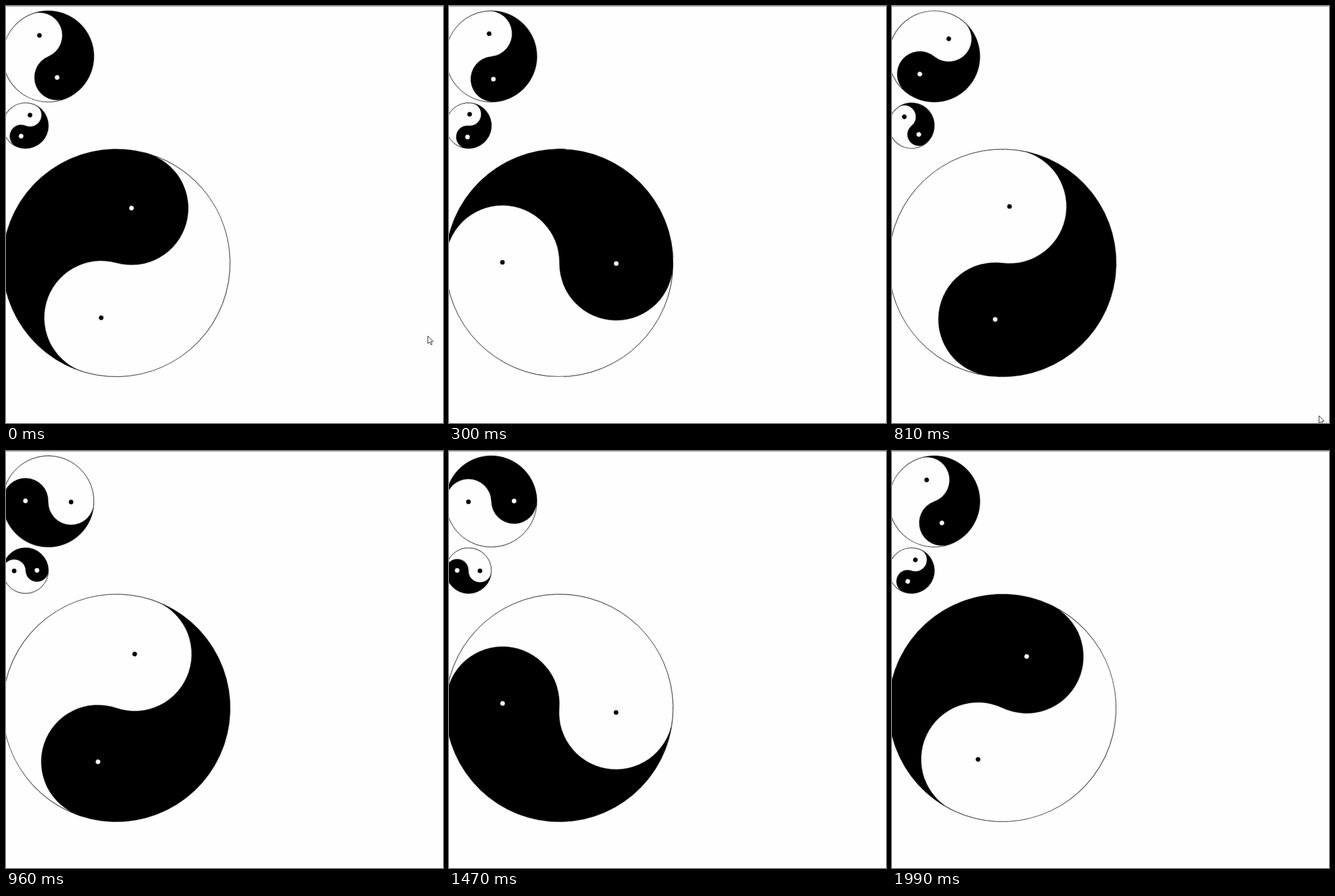
Animation of 766 by 731 pixels, one loop 2.09 s. Source, as an HTML page:

```html
<!DOCTYPE html>
<html lang="en">
<head>
<meta charset="utf-8">
<title>Turning yin-yang</title>
<style>
  html, body { margin: 0; height: 100%; overflow: hidden; background: #fefefe; }
  svg { display: block; }
</style>
</head>
<body>
<svg id="stage" width="766" height="731" viewBox="0 0 766 731">
  <rect width="766" height="1.4" fill="#b4b4b4"/>
  <path id="cursor" d="M0 0V13.2L3.1 10.4 5.3 15.4 7.4 14.5 5.2 9.6H9.2Z" fill="#fff" stroke="#222"/>
</svg>
<script>
const LOOP = 2090;   // ms
const TURN = 1925;   // ms for one full turn
const OFFSET = 1330; // ms into the turn when the loop starts
const BAR = 655;     // the uneven stepping rhythm repeats every bar
const BEATS = [0, 150, 290, 410, 540];

const stage = document.getElementById('stage');
const cursor = document.getElementById('cursor');

function yinYang(x, y, r, degrees, easing) {
  const h = r / 2;
  stage.insertAdjacentHTML('beforeend', `<g transform="translate(${x} ${y})"><g>
    <circle r="${r}" fill="#fefefe" stroke="#000"/>
    <path d="M0 ${-r}A${r} ${r} 0 0 1 0 ${r}A${h} ${h} 0 0 1 0 0A${h} ${h} 0 0 0 0 ${-r}"/>
    <circle cy="${-h}" r="4"/>
    <circle cy="${h}" r="4" fill="#fefefe"/></g></g>`);
  const spin = stage.lastElementChild.firstElementChild.animate(
    { transform: ['rotate(0deg)', `rotate(${degrees}deg)`] },
    { duration: TURN, easing, fill: 'both' });
  spin.pause();
  return spin;
}

const spins = [
  yinYang(74.1, 88.4, 79.9, 360, 'ease'),
  yinYang(34.3, 209.7, 40, -360, 'ease'),
  yinYang(193.4, 450.4, 199.4, 360, 'ease-in')
];

function draw(t) {
  const bar = Math.floor(t / BAR);
  const beat = BEATS.findLastIndex(start => start <= t % BAR);
  const held = bar * BAR + BEATS[beat];
  for (const spin of spins) spin.currentTime = (held + OFFSET) % TURN;

  // The pointer arcs out past the right edge, back in, and off the bottom.
  const k = bar * BEATS.length + beat;
  const x = 739.5 + 20.1 * k - 3.1 * k * k;
  const y = 578.5 + 23.3 * k;
  cursor.setAttribute('transform', `translate(${x} ${y})`);
}

let begin;
function tick(now) {
  begin ??= now;
  draw((now - begin) % LOOP);
  requestAnimationFrame(tick);
}
draw(0);
requestAnimationFrame(tick);
</script>
</body>
</html>
```
